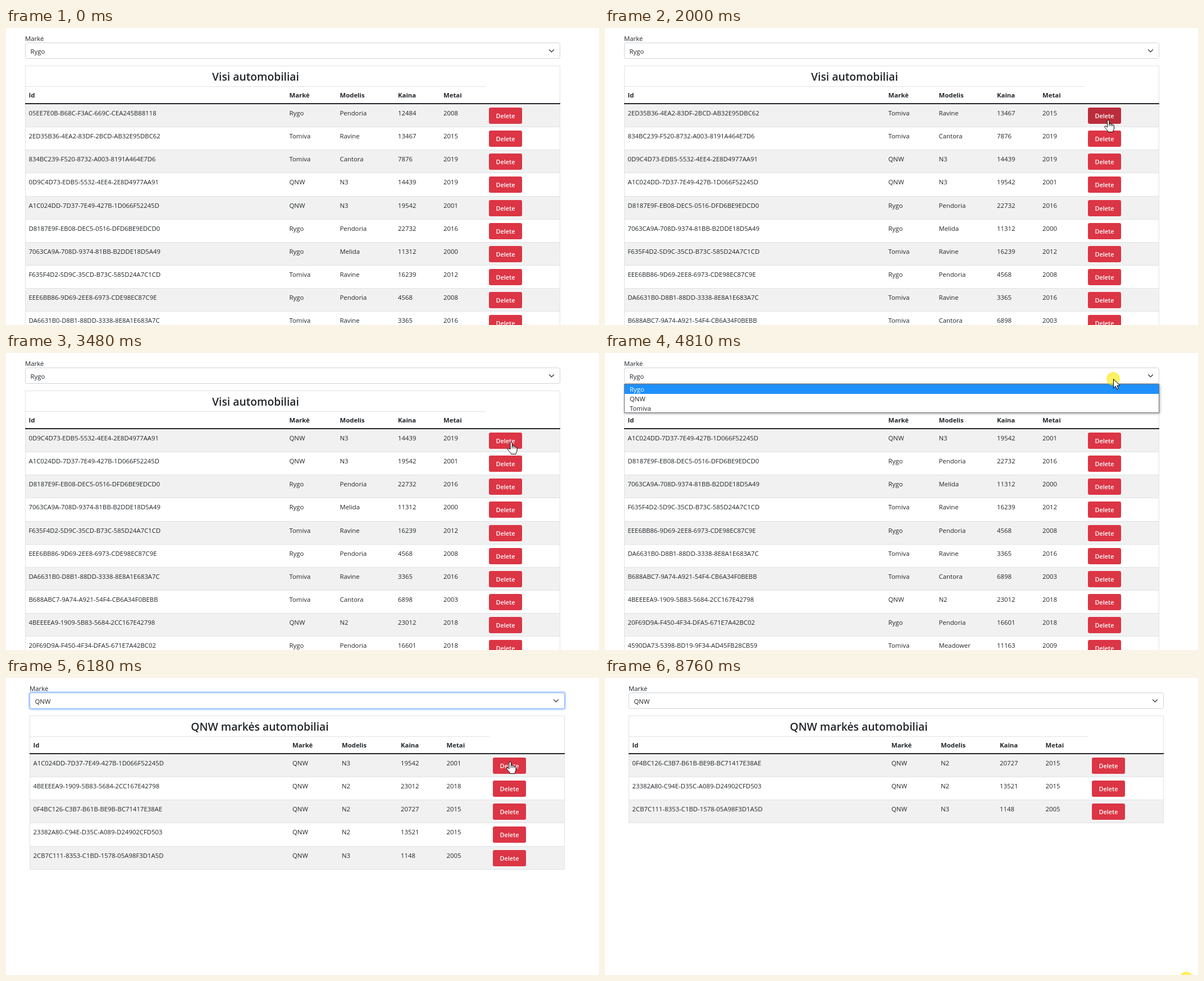
These frames come from a looping animation (1056 px wide and 530 px high, 8820 ms). An HTML page:

```html
<!DOCTYPE html>
<html lang="lt">
<head>
<meta charset="utf-8">
<title>Visi automobiliai</title>
<style>
  html, body { margin: 0; width: 100%; height: 100%; overflow: hidden; background: #fff; }
  svg { display: block; width: 1056px; height: 530px; }
  text { font: 11.35px "Open Sans", "Noto Sans", sans-serif; fill: #212529; }
  .head { font-weight: 700; }
  .title { font-size: 19.3px; font-weight: 600; text-anchor: middle; }
  .btn { font-size: 10.9px; font-weight: 600; fill: #fff; text-anchor: middle; }
  .pick { fill: #fff; }
</style>
</head>
<body>
<svg viewBox="0 0 1056 530">
  <defs>
    <filter id="shade" x="-5%" y="-20%" width="110%" height="160%">
      <feDropShadow dx="1" dy="1" stdDeviation="2" flood-opacity=".4"/>
    </filter>
  </defs>
  <g id="page"></g>
  <circle id="halo" r="12" fill="#f8e800" fill-opacity=".62"/>
  <g id="pointer" stroke="#000" stroke-linejoin="round">
    <path id="arrow" fill="#fff" d="M.5 .5V16.7L4.2 13.2 6.6 18.8 9.2 17.7 6.8 12.1H12Z"/>
    <g id="hand">
      <path fill="#fff" d="M0 14V3a1.7 1.7 0 0 1 3.4 0V9a1.6 1.6 0 0 1 3.2 .5a1.6 1.6 0 0 1 3 .8a1.5 1.5 0 0 1 2.4 1.2V16C12 18.5 10 19.5 10 22.5H1.5C1.5 20-2 18-4.6 13.8C-5.6 12-3.2 11 0 14Z"/>
      <path fill="none" d="M3.4 9V12.5M6.6 9.5V12.5M9.6 10.3V12.5"/>
    </g>
  </g>
</svg>
<script>
const LOOP = 8820;
const brands = ["Rygo", "QNW", "Tomiva"];
const parse = s => s.trim().split("\n").map(l => l.trim().split(" "));

const allCars = parse(`
  05EE7E0B-B68C-F3AC-669C-CEA245B88118 Rygo Pendoria 12484 2008
  2ED35B36-4EA2-83DF-2BCD-AB32E95DBC62 Tomiva Ravine 13467 2015
  834BC239-F520-8732-A003-8191A464E7D6 Tomiva Cantora 7876 2019
  0D9C4D73-EDB5-5532-4EE4-2E8D4977AA91 QNW N3 14439 2019
  A1C024DD-7D37-7E49-427B-1D066F52245D QNW N3 19542 2001
  D8187E9F-EB08-DEC5-0516-DFD6BE9EDCD0 Rygo Pendoria 22732 2016
  7063CA9A-708D-9374-81BB-B2DDE18D5A49 Rygo Melida 11312 2000
  F635F4D2-5D9C-35CD-B73C-585D24A7C1CD Tomiva Ravine 16239 2012
  EEE6BB86-9D69-2EE8-6973-CDE98EC87C9E Rygo Pendoria 4568 2008
  DA6631B0-D8B1-88DD-3338-8E8A1E683A7C Tomiva Ravine 3365 2016
  B688ABC7-9A74-A921-54F4-CB6A34F0BEBB Tomiva Cantora 6898 2003
  4BEEEEA9-1909-5B83-5684-2CC167E42798 QNW N2 23012 2018
  20F69D9A-F450-4F34-DFA5-671E7A42BC02 Rygo Pendoria 16601 2018
  4590DA73-5398-BD19-9F34-AD45FB28CB59 Tomiva Meadower 11163 2009`);

const brandCars = allCars.filter(c => /^(A1C0|4BEE)/.test(c[0])).concat(parse(`
  0F4BC126-C3B7-B61B-BE9B-BC71417E38AE QNW N2 20727 2015
  23382A80-C94E-D35C-A089-D24902CFD503 QNW N2 13521 2015
  2CB7C111-8353-C1BD-1578-05A98F3D1A5D QNW N3 1148 2005`));

const views = [
  { x: 34, line: 854, btn: 860, mid: 444.5, cols: [40.5, 504.5, 594.5, 698, 779],
    title: "Visi automobiliai", brand: brands[0], cars: allCars },
  { x: 42, line: 861, btn: 867, mid: 452, cols: [48.5, 510, 598, 703, 784.5],
    title: brands[1] + " markės automobiliai", brand: brands[1], cars: brandCars }
];

// Timeline in ms
const SWITCH = 5650, OPEN = 4780, FOCUS = [4880, 6800], PICK = 5250, SHOWN = [100, 8480];
const deletes = [[1860, 2730, 3480, 3940], [6860, 7480]];
const halos = [[1720, 1860], [2600, 2730], [3350, 3480], [3810, 3940],
  [4740, 4880], [5520, 5650], [6730, 6860], [7340, 7480], [8760, LOOP]];
const path = [
  [100, 994, 483], [240, 975, 400], [450, 925, 255], [640, 900, 180], [780, 896, 160],
  [1860, 896, 160], [2000, 894.5, 163], [2410, 898, 160], [2730, 898, 160], [3060, 898, 158],
  [4210, 898, 158], [4420, 903, 110], [4700, 905, 46], [4880, 905, 46], [5090, 905, 62],
  [5300, 904, 80], [5720, 904, 80], [6110, 895, 137], [6180, 896, 148], [6380, 902, 158],
  [8150, 902, 158], [8250, 950, 270], [8370, 1042, 410], [8480, 1035, 536]
];

const BTN_W = 59, BTN_H = 29;
const within = (t, [a, b]) => t >= a && t < b;
const rowY = i => 136 + Math.round(i * 41.15);
const rect = (x, y, w, h, fill, more = "") =>
  `<rect x="${x}" y="${y}" width="${w}" height="${h}" fill="${fill}" ${more}/>`;
const label = (x, y, s, cls = "") => `<text x="${x}" y="${y}" class="${cls}">${s}</text>`;

function place(t) {
  const n = path.findIndex(p => p[0] > t);
  if (n < 0) return path[path.length - 1].slice(1);
  if (n === 0) return path[0].slice(1);
  const a = path[n - 1], b = path[n], k = (t - a[0]) / (b[0] - a[0]);
  return [a[1] + (b[1] - a[1]) * k, a[2] + (b[2] - a[2]) * k];
}

function pageState(t) {
  const v = t < SWITCH ? 0 : 1;
  const gone = deletes[v].filter(d => t >= d).length;
  return {
    v, gone,
    rows: Math.min(10, views[v].cars.length - gone),
    fresh: deletes[v].some(d => within(t, [d, d + 70])),
    open: within(t, [OPEN, SWITCH]),
    pick: t < PICK ? 0 : 1,
    focus: within(t, FOCUS)
  };
}

// Index of the button under the pointer, or -1
function buttonAt(t, s) {
  if (!within(t, SHOWN)) return -1;
  const [x, y] = place(t), left = views[s.v].btn;
  if (x < left || x > left + BTN_W) return -1;
  for (let i = 0; i < s.rows; i++)
    if (y >= rowY(i) + 6 && y <= rowY(i) + 6 + BTN_H) return i;
  return -1;
}

function drawSelect(v, focus) {
  const ring = focus
    ? `<rect x="${v.x - 1}" y="25" width="955" height="31" rx="4.5" fill="none" stroke="#0d6efd" stroke-opacity=".25" stroke-width="3"/>`
    : "";
  return label(v.x, 22.5, "Markė") + ring +
    rect(v.x + .5, 26.5, 952, 28, "#fff", `rx="3" stroke="${focus ? "#86b7fe" : "#ced4da"}"`) +
    label(v.x + 9.5, 46, v.brand) +
    `<path d="M${v.x + 933.5} 38.7l4 4 4-4" fill="none" stroke="#343a40" stroke-width="1.3" stroke-linecap="round" stroke-linejoin="round"/>`;
}

function drawTable(v, s, hover) {
  const line = "#dee2e6", end = rowY(s.rows);
  const heads = ["Id", "Markė", "Modelis", "Kaina", "Metai"];
  let out = label(v.mid, 94, v.title, "title") + rect(v.x, 104, v.line - v.x, 1, line) +
    heads.map((h, i) => label(v.cols[i], 124, h, "head")).join("");
  for (let i = 0; i < s.rows; i++) {
    const y = rowY(i), next = rowY(i + 1);
    if (i % 2 === 0) out += rect(v.x, y, 953, next - y, "#f1f1f1");
    out += rect(v.x, next - 1, 953, 1, line) +
      v.cars[s.gone + i].map((c, k) => label(v.cols[k], y + 20, c)).join("") +
      rect(v.btn, y + 6, BTN_W, BTN_H, i === hover ? "#bb2d3b" : "#dc3545", 'rx="3"') +
      label(v.btn + BTN_W / 2, y + 25, "Delete", "btn");
  }
  return out + rect(v.x, 67, 953, 1, line) + rect(v.x, 67, 1, end - 67, line) +
    rect(v.x + 952, 67, 1, end - 67, line) + rect(v.x, 134, 953, 2, "#212529");
}

function drawOptions(v, pick) {
  return rect(v.x + .5, 55.5, 952, 51, "#fff", 'stroke="#70757a" filter="url(#shade)"') +
    rect(v.x + 1, 56 + pick * 17, 951, 17, "#1e90ff") +
    brands.map((b, i) => label(v.x + 10, 68.5 + i * 17, b, i === pick ? "pick" : "")).join("");
}

const $ = id => document.getElementById(id);
const show = (el, on) => el.setAttribute("visibility", on ? "visible" : "hidden");
const move = (el, [x, y]) => el.setAttribute("transform", `translate(${x} ${y})`);
const page = $("page"), halo = $("halo"), pointer = $("pointer"), arrow = $("arrow"), hand = $("hand");
let last = "";

function render(t) {
  const s = pageState(t), v = views[s.v];
  const hover = s.fresh || s.open ? -1 : buttonAt(t - 90, s);
  const key = JSON.stringify([s, hover]);
  if (key !== last) {
    last = key;
    page.innerHTML = drawSelect(v, s.focus) + drawTable(v, s, hover) +
      (s.open ? drawOptions(v, s.pick) : "");
  }
  const at = place(t), shown = within(t, SHOWN), over = buttonAt(t, s) >= 0;
  move(pointer, at);
  move(halo, at);
  show(arrow, shown && !over);
  show(hand, shown && over);
  show(halo, halos.some(h => within(t, h)));
}

const start = performance.now();
function tick() {
  render((performance.now() - start) % LOOP);
  requestAnimationFrame(tick);
}
tick();
</script>
</body>
</html>
```
